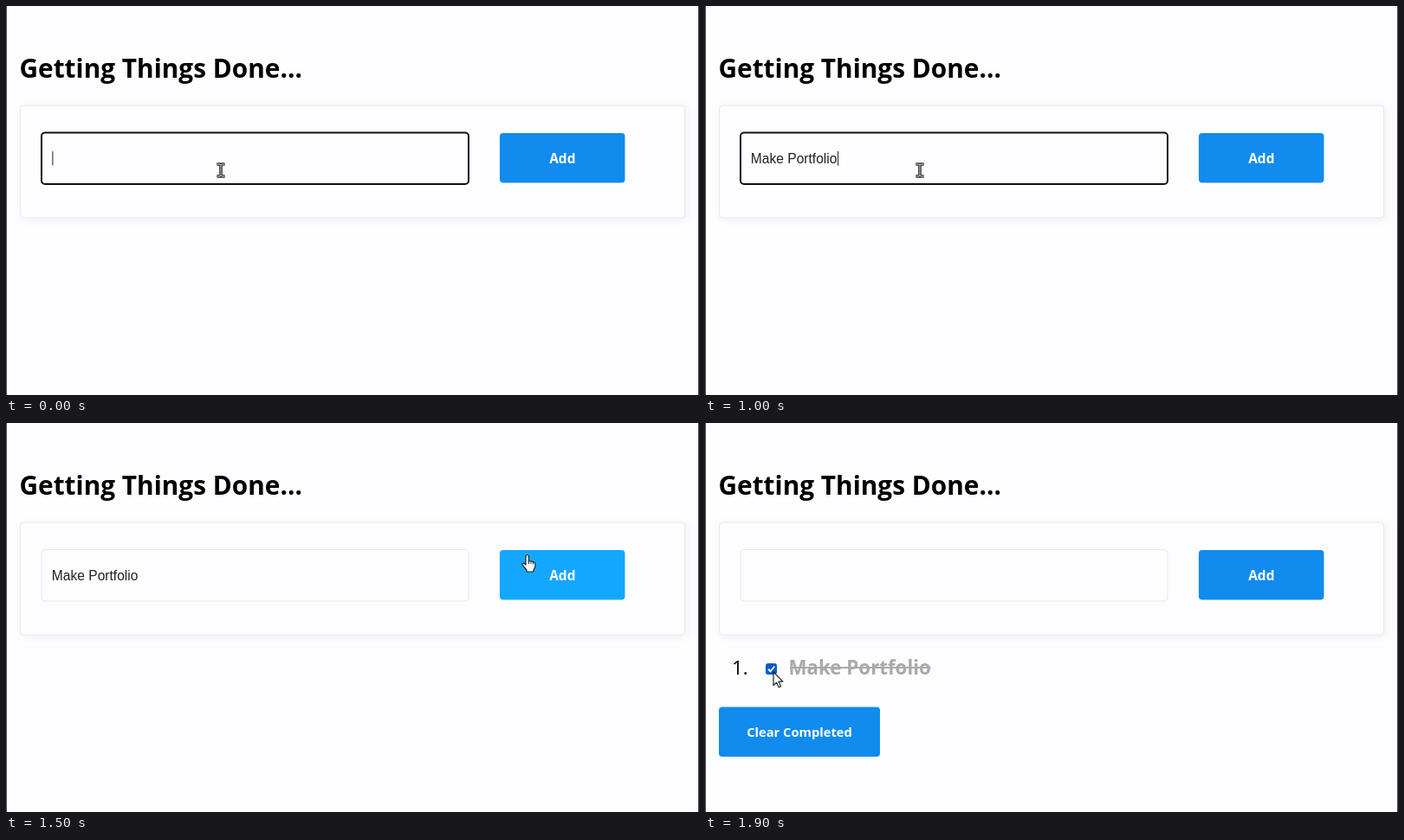
These frames come from a looping animation (800x450 px, 2000 ms). An HTML page:

```html
<!DOCTYPE html>
<html lang="en">
<head>
<meta charset="utf-8">
<title>To-do list</title>
<style>
  html, body { margin: 0; width: 100%; height: 100%; overflow: hidden; background: #fdfcff; }
  svg { display: block; width: 100%; height: 100%; }
  text { font-family: "Open Sans", "Noto Sans", sans-serif; white-space: pre; }
  .bold { font-weight: 700; }
  .label { font-weight: 700; fill: #fff; text-anchor: middle; }
  .button { fill: #118bee; }
  .button.hover { fill: #14a7ff; }
  .frame { fill: #fdfcff; stroke: #e9e8ec; }
  .frame.focus { stroke: #111016; stroke-width: 2; }
  #typed { font: 15.6px "Liberation Sans", Arial, sans-serif; fill: #222; }
  #card { filter: drop-shadow(2px 2px 4px #f1f0f4); }
  #cursor > g { fill: #fff; stroke: #222; stroke-width: 1.2; stroke-linejoin: round; }
</style>
</head>
<body>
<svg viewBox="0 0 800 450">
  <rect width="800" height="450" fill="#fdfcff"/>
  <path d="M.5 0V450M799.5 0V450" stroke="#48474c"/>
  <text class="bold" x="15.5" y="83" font-size="29.8">Getting Things Done...</text>

  <rect id="card" class="frame" x="16.5" y="115" width="767" height="130" rx="4"/>
  <rect id="input" class="frame" x="41" y="146.5" width="493" height="59.5" rx="4"/>
  <text id="typed" x="52.8" y="181.5"></text>
  <rect id="caret" y="168" width="1" height="16.5" fill="#222"/>
  <rect id="add" class="button" x="570" y="147" width="144.5" height="57.5" rx="4"/>
  <text class="label" x="642.3" y="181.5" font-size="15.5">Add</text>

  <g id="list">
    <text x="31" y="291" font-size="22.5">1.</text>
    <rect id="box" x="70.5" y="278.5" width="12" height="12" rx="2"/>
    <path id="tick" d="M73 284.7l2.5 2.6 4.7-5.6" fill="none" stroke="#fff" stroke-width="1.9"/>
    <text id="item" class="bold" x="96.5" y="291" font-size="22.3">Make Portfolio</text>
    <path id="strike" d="M98 283H260.5" stroke="#aaa" stroke-width="2"/>
    <rect class="button" x="16" y="328.5" width="186" height="57.5" rx="4"/>
    <text class="label" x="109" y="363" font-size="14.7">Clear Completed</text>
  </g>

  <g id="cursor">
    <g id="beam">
      <path id="stem" d="M-4.5-7h3.5l1 1 1-1h3.5M0-6V6M-4.5 7h3.5l1-1 1 1h3.5" fill="none" stroke="#333" stroke-width="3.2"/>
      <use href="#stem" style="stroke-width:1"/>
      <path d="M-4.5-7h3.5l1 1 1-1h3.5M0-6V6M-4.5 7h3.5l1-1 1 1h3.5" fill="none" stroke="#ccc" stroke-width="1"/>
    </g>
    <g id="hand">
      <path d="M-2 2q2-3 3.5 0v5.5l5 1q2.5.5 2.5 3v2.5l-2 4v2h-8v-2l-5-6q-.5-2 1.5-2l2.5 2z"/>
      <path d="M1.5 7v4M4 8v3M6.5 8.5v3" stroke-width="1"/>
    </g>
    <g id="arrow"><path d="M0 0V15.5l3.6-3.4 2.6 5.6 2.4-1.1-2.6-5.5h4.9z"/></g>
  </g>
</svg>
<script>
const $ = id => document.getElementById(id);
const show = (id, on) => $(id).style.display = on ? "" : "none";
const STEP = 100, STEPS = 20;
const TASK = "Make Portfolio";

// Pointer position at each step from FIRST_MOVE on.
const FIRST_MOVE = 10;
const pointer = [
  [248, 190], [268, 178], [332, 151], [500, 149], [600, 154],
  [602, 152], [555, 158], [330, 213], [110, 285], [79, 288]
];

function draw(step) {
  const added = step >= 16, checked = step >= 19;
  const hover = step === 14 || step === 15;
  const focus = step < 15;

  $("typed").textContent = added ? "" : TASK.slice(0, Math.floor(step * 1.75));
  $("caret").setAttribute("x", 53.4 + $("typed").getComputedTextLength());
  show("caret", step < 13);
  $("input").classList.toggle("focus", focus);
  $("add").classList.toggle("hover", hover);

  show("list", added);
  show("tick", checked);
  show("strike", checked);
  $("box").setAttribute("fill", checked ? "#005cc8" : "#fff");
  $("box").setAttribute("stroke", checked ? "#005cc8" : "#767676");
  $("item").setAttribute("fill", checked ? "#aaa" : "#000");

  const [x, y] = pointer[Math.max(0, step - FIRST_MOVE)];
  $("cursor").setAttribute("transform", `translate(${x} ${y})`);
  show("beam", step < 14);
  show("hand", hover);
  show("arrow", added);
}

function tick() {
  draw(Math.floor((performance.now() - start) / STEP) % STEPS);
  requestAnimationFrame(tick);
}
const start = performance.now();
tick();
</script>
</body>
</html>
```
